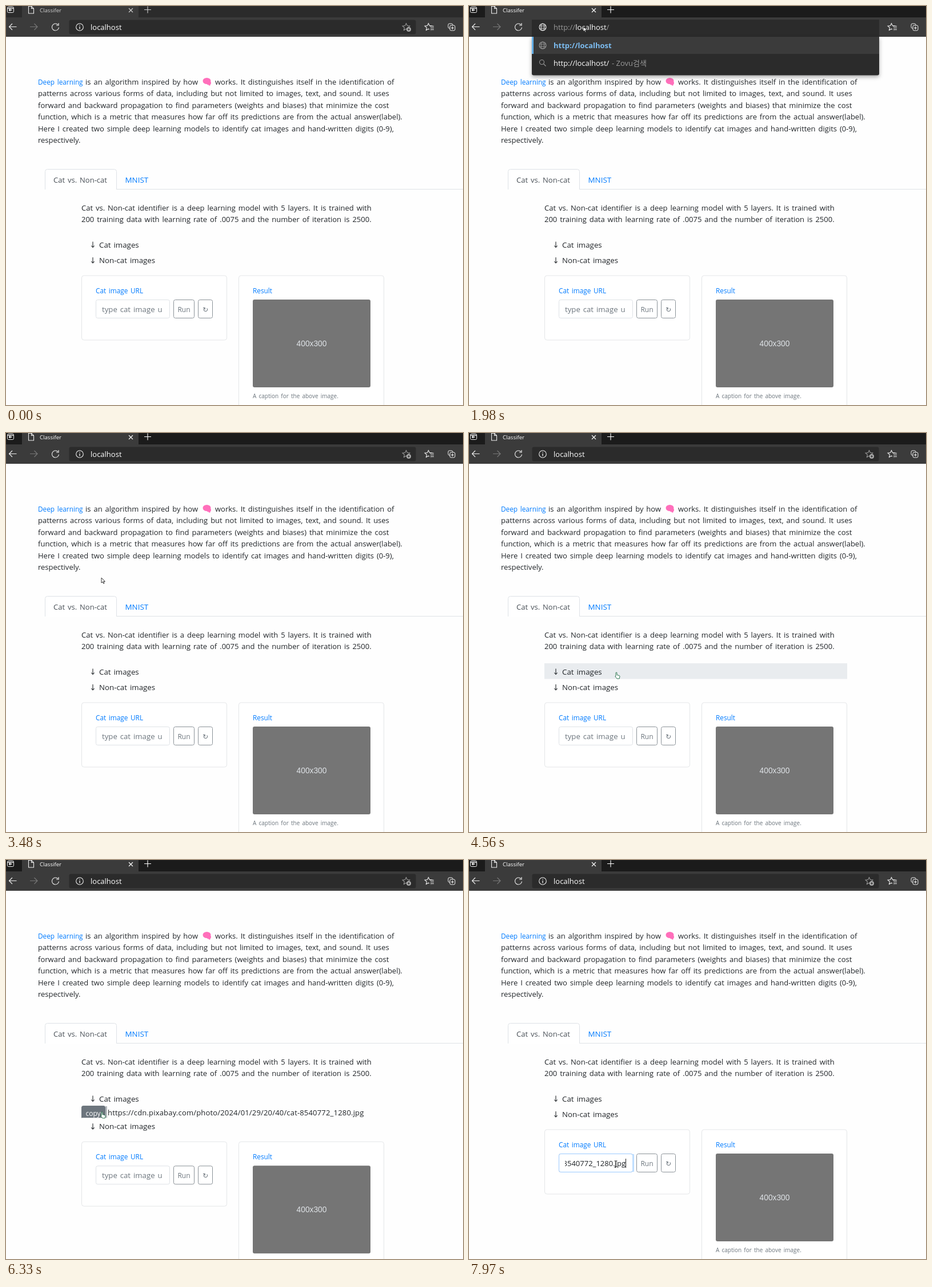
Write an HTML page with a canvas that moves like this. It is 800 by 700 pixels and loops after 8 s.

```html
<!DOCTYPE html>
<html lang="en">
<head>
<meta charset="utf-8">
<style>
html, body { margin: 0; width: 100%; height: 100%; overflow: hidden; background: #fefefe; }
canvas { display: block; }
</style>
</head>
<body>
<canvas id="stage" width="800" height="700"></canvas>
<script>
const g = document.getElementById('stage').getContext('2d');
const LOOP = 8000;
const INK = '#212529', BLUE = '#007bff', GRAY = '#6c757d', LINE = '#dee2e6', WHITE = '#fff';
const SANS = '"Open Sans", "Noto Sans CJK KR", sans-serif';
const ARIAL = '"Liberation Sans", sans-serif';

// Two page layouts: the styled one and the one flashed while reloading.
const STYLED = {
  gap: 1.55, bg: '#fefefe', radius: 4, link: 11.8, weight: 400, up: 0, gutter: 132,
  item: [163, 152, 13.3], intro: [139, 352, 366], tab: [68, 126], mnist: 208.5,
  lines: ['works. It distinguishes itself in the identification of',
    'patterns across various forms of data, including but not limited to images, text, and sound. It uses',
    'forward and backward propagation to find parameters (weights and biases) that minimize the cost',
    'function, which is a metric that measures how far off its predictions are from the actual answer(label).',
    'Here I created two simple deep learning models to identify cat images and hand-written digits (0-9),',
    'respectively.'],
  about: ['Cat vs. Non-cat identifier is a deep learning model with 5 layers. It is trained with',
    '200 training data with learning rate of .0075 and the number of iteration is 2500.'],
  cardW: 255, cardX: 407, input: [157, 129], run: [293, 37], redo: [336, 26],
  hint: [168, 106, 'type cat image url'], photo: [432, 206, 154], label: 13.8, caption: [688, 10]
};
const BARE = {
  gap: 0, bg: '#f9f9f9', radius: 0, link: 11.4, weight: 600, up: 20.5, gutter: 135,
  item: [165, 158, 13.1], intro: [138, 341, 354], tab: [68, 122], mnist: 204,
  lines: ['works. It distinguishes itself in the identification of patterns',
    'across various forms of data, including but not limited to images, text, and sound. It uses forward and',
    'backward propagation to find parameters (weights and biases) that minimize the cost function, which is a',
    'metric that measures how far off its predictions are from the actual answer(label). Here I created two simple',
    'deep learning models to identify cat images and hand-written digits (0-9), respectively.'],
  about: ['Cat vs. Non-cat identifier is a deep learning model with 5 layers. It is trained with 200',
    'training data with learning rate of .0075 and the number of iteration is 2500.'],
  cardW: 250, cardX: 410, input: [159, 70], run: [236, 64], redo: [306, 54],
  hint: [179, 40, 'type'], photo: [435, 200, 150], label: 13.3, caption: [684, 10.1]
};
const URLS = ['https://cdn.pixabay.com/photo/2024/01/29/20/40/cat-8540772_1280.jpg',
  'https://cdn.pixabay.com/photo/2024/02/17/00/18/cat-8578562_1280.jpg',
  'https://cdn.pixabay.com/photo/2023/06/01/06/22/british-shorthair-'];

// Pointer stops: time, x, y
const PATH = [[190, 739, 631], [600, 200, 36], [2980, 200, 36], [3770, 152, 349], [3820, 152, 350],
  [4100, 250, 418], [4300, 250, 418], [4560, 256, 420], [5110, 256, 421], [5580, 166, 442],
  [6500, 166, 442], [6850, 250, 532], [7040, 251, 532], [7430, 251, 532], [7570, 257, 533]];

const clamp = v => Math.max(0, Math.min(1, v));
const ramp = (t, start, len) => clamp((t - start) / len);
const easeOut = p => 1 - (1 - p) ** 2;
const smooth = p => p * p * (3 - 2 * p);

function rect(x, y, w, h, color) {
  g.fillStyle = color;
  g.fillRect(x, y, w, h);
}
function box(x, y, w, h, r, fill, stroke) {
  g.beginPath();
  g.roundRect(x + .5, y + .5, w - 1, h - 1, r);
  if (fill) { g.fillStyle = fill; g.fill(); }
  if (stroke) { g.strokeStyle = stroke; g.lineWidth = 1; g.stroke(); }
}
function text(s, x, y, color = INK, size = 13, weight = 400, family = SANS) {
  g.font = `${weight} ${size}px ${family}`;
  g.fillStyle = color;
  g.fillText(s, x, y);
}
function stroke(d, color = '#eee', width = 1.1) {
  g.strokeStyle = color;
  g.lineWidth = width;
  g.stroke(new Path2D(d));
}
function clipped(x, y, w, h, draw) {
  g.save();
  g.beginPath();
  g.rect(x, y, w, h);
  g.clip();
  draw();
  g.restore();
}
function ring(x, y, r, color = '#eee', a = 0, b = 7) {
  g.beginPath();
  g.arc(x, y, r, a, b);
  g.strokeStyle = color;
  g.lineWidth = 1.1;
  g.stroke();
}
function centered(draw) {
  g.textAlign = 'center';
  draw();
  g.textAlign = 'left';
}

function brain(x) {
  g.fillStyle = '#ff6fbb';
  g.beginPath();
  g.ellipse(x - .5, 131.5, 7, 5.6, 0, 0, 7);
  g.ellipse(x + 3, 135, 4, 3.4, 0, 0, 7);
  g.fill();
  rect(x + 3, 136, 2.5, 3.5, '#ff6fbb');
}

function links(height, t) {
  clipped(0, 431, 800, height, () => {
    const on = ramp(t, 5450, 130);
    for (let i = 0; i < 3; i++) {
      const y = 431 + i * 26, hot = i === 0 && on > 0;
      box(132, y, 42, 27, 3, WHITE, '#8b9298');
      if (hot) {
        g.globalAlpha = on;
        box(132, y, 42, 27, 3, GRAY, GRAY);
        g.globalAlpha = 1;
      }
      if (hot && t > 6050) rect(174, y + 1, 3, 26, '#b5babe');
      text('copy', 139.5, y + 18, on > .5 && hot ? WHITE : GRAY, 12);
      g.letterSpacing = '0.18px';
      text(URLS[i], 178, y + 17);
      g.letterSpacing = '0px';
    }
    text('8032816_1280.jpg', 132, 525.5);
  });
}

function field(L, t) {
  const [x, w] = L.input, focus = ramp(t, 7430, 150), pasted = t >= 7930;
  box(x, 515, w + 1, 33, 3, WHITE, LINE);
  if (focus) {
    g.globalAlpha = focus;
    box(x, 515, w + 1, 33, 3, null, '#9ccaff');
    rect(x + w, 516, 3, 31, '#bfdeff');
    g.globalAlpha = 1;
  }
  const [hx, hw, hint] = L.hint;
  clipped(hx, 516, hw, 31, () => {
    if (pasted) {
      g.textAlign = 'right';
      text('8540772_1280.jpg', 274, 537);
      g.textAlign = 'left';
    } else text(hint, hx, 537, GRAY, 13.2);
  });
  if (focus) rect(pasted ? 274 : 168, 524, 1, 16, '#222');
}

function page(L, t, open) {
  rect(0, 54, 800, 646, L.bg);
  g.wordSpacing = L.gap + 'px';
  const [introX, brainX, restX] = L.intro;
  text('Deep learning', 56, 137.5, BLUE, L.link, L.weight);
  text('is an algorithm inspired by how', introX, 137.5);
  brain(brainX);
  L.lines.forEach((s, i) => text(s, i ? 56 : restX, 137.5 + 20.5 * i));

  g.save();
  g.translate(0, -L.up);
  const [tabX, tabW] = L.tab;
  rect(tabX, 321, 732, 1, LINE);
  box(tabX, 286, tabW, 40, 4, WHITE, LINE);
  rect(tabX - 1, 322, tabW + 2, 5, L.bg);
  rect(tabX + 1, 321, tabW - 2, 1, WHITE);
  text('Cat vs. Non-cat', 83, 309.5, '#495057');
  text('MNIST', L.mnist, 309.5, BLUE, 13.4);
  L.about.forEach((s, i) => text(s, L.gutter, 358.5 + 20.5 * i));

  const hover = ramp(t, 4020, 80) * (1 - ramp(t, 6050, 100));
  if (hover) {
    g.globalAlpha = hover;
    rect(132, 404, 530, 27.5, '#e9ecef');
    g.globalAlpha = 1;
  }
  const [itemX, arrowX, itemSize] = L.item;
  const item = (s, y) => {
    stroke(`M${arrowX} ${y - 10}v10m-2.7 -3l2.7 3l2.7 -3`, INK);
    text(s, itemX, y, INK, itemSize);
  };
  item('Cat images', 423.5);
  if (open > 0) links(open, t);
  g.translate(0, open);
  item('Non-cat images', 451);

  box(L.gutter, 472.5, L.cardW, 114, L.radius, WHITE, '#e4e6e8');
  box(L.cardX, 472.5, L.cardW, 300, L.radius, WHITE, '#e4e6e8');
  text('Cat image URL', L.input[0], 504, BLUE, L.link, L.weight);
  field(L, t);
  for (const [b, s, family] of [[L.run, 'Run', SANS], [L.redo, '↻', '"DejaVu Sans", sans-serif']]) {
    box(b[0], 515, b[1], 33, 3, WHITE, '#8b9298');
    centered(() => text(s, b[0] + b[1] / 2, 536.5, GRAY, 12, 400, family));
  }
  const [px, pw, ph] = L.photo;
  text('Result', px, 504, BLUE, L.link, L.weight);
  g.beginPath();
  g.roundRect(px, 515, pw, ph, 3);
  g.fillStyle = '#757575';
  g.fill();
  centered(() => text('400x300', px + pw / 2, 515 + ph / 2 + 4.7, LINE, L.label, 400, ARIAL));
  const [capY, capSize] = L.caption;
  text('A caption for the above image.', px, capY, GRAY, capSize, L.weight);
  g.restore();
  g.wordSpacing = '0px';
}

function globe(y, color) {
  ring(129, y, 6, color);
  stroke(`M123.5 ${y - 2}h11M123.5 ${y + 2}h11`, color, .9);
  g.beginPath();
  g.ellipse(129, y, 2.8, 6, 0, 0, 7);
  g.stroke();
}

function dropdown(alpha) {
  g.save();
  g.globalAlpha = alpha;
  if (alpha === 1) { g.shadowColor = 'rgba(0,0,0,.35)'; g.shadowBlur = 7; g.shadowOffsetY = 3; }
  g.beginPath();
  g.roundRect(110, 54, 608, 67.5, [0, 0, 3, 3]);
  g.fillStyle = '#2b2b2b';
  g.fill();
  g.shadowColor = 'transparent';
  if (alpha === 1) rect(110, 54, 608, 30, '#3b3b3b');
  rect(110, 54, 3, 30, '#63ade5');
  globe(69, '#999');
  text('http://localhost', 148, 73.5, '#7cbcf0', 13, 700);
  ring(127.5, 98.5, 4, '#999');
  stroke('M130.5 101.5l4 4', '#999');
  text('http://localhost/', 148, 104.5, WHITE);
  text('- Zovu검색', 250, 104.5, '#999');
  g.restore();
}

function chrome(t) {
  const active = t >= 960, typing = active && t < 2380, loading = t >= 2380 && t < 2630;
  rect(0, 0, 800, 21, active ? '#1b1b1b' : '#2b2b2b');
  rect(0, 20, 800, 34, '#3b3b3b');
  rect(28, 0, 204, 21, '#3b3b3b');
  box(2, 1, 12, 11, 2, null, '#eee');
  stroke('M2 4h11M10.5 7h-5m2 -2l-2 2l2 2', '#eee', 1.5);

  if (loading) {
    g.fillStyle = '#4aa3f0';
    g.beginPath();
    g.arc(39, 9, 1.3, 0, 7);
    g.fill();
  } else stroke('M39.5 .5h5l4 4v8.5h-9zM44.5 .5v4h4');
  const title = active ? WHITE : '#d0d0d0';
  text('Classifer', 59, 10.5, title, 9.6);
  stroke('M215 4l7 7M222 4l-7 7', title);
  stroke('M242 6.5h12M248 .5v12', title);

  stroke('M18.5 36.5h-13m5.5 -5.5l-5.5 5.5l5.5 5.5', '#eee', 1.2);
  stroke('M42 36.5h13m-5.5 -5.5l5.5 5.5l-5.5 5.5', '#777', 1.2);
  if (loading) stroke('M81.5 32l9.5 9.5M91 32l-9.5 9.5', '#eee', 1.2);
  else {
    ring(86.5, 37, 6, '#eee', .1, 5.5);
    stroke('M92 30v4h-4', '#eee', 1.2);
  }

  const star = 'l1.9 4.1l4.5 .5l-3.4 3l1 4.4l-4 -2.3l-4 2.3l1 -4.4l-3.4 -3l4.5 -.5z';
  stroke('M739.5 30.5' + star);
  rect(741, 35, 9, 8, '#3b3b3b');
  stroke('M742 35.5h7M743 38.5h6M743 41.5h6');
  box(773.5, 30.5, 9, 9, 2, null, '#eee');
  box(776.5, 33.5, 10, 10, 2, '#3b3b3b', '#eee');
  stroke('M781.5 36v5M779 38.5h5');

  const hover = t > 560 && !active;
  box(110, 24, 608, 26, 3, hover ? '#303030' : '#2b2b2b', typing && t < 1480 ? '#63ade5' : null);
  if (typing) {
    if (t >= 1480) rect(110, 24, 608, 30, '#2b2b2b');
    globe(37, '#eee');
    if (t < 1480) {
      rect(148, 28, 98, 18, '#2a6fb5');
      text('http://localhost/', 148, 41.5, WHITE);
    } else {
      let x = 148;
      for (const [s, c] of [['http://', '#999'], ['localhost', WHITE], ['/', '#999']]) {
        text(s, x, 41.5, c);
        x += g.measureText(s).width;
      }
      if (t < 1980) rect(246, 27, 1, 18, WHITE);
    }
  } else {
    ring(129, 37, 6.3);
    stroke('M129 36v4.5M129 33.2v1.4', '#eee', 1.3);
    text('localhost', 148, 41.5, WHITE);
    stroke('M700.5 30.5' + star, '#999');
    g.beginPath();
    g.arc(705, 41, 4, 0, 7);
    g.fillStyle = '#aaa';
    g.fill();
    stroke('M703 41h4M705 39v4', '#2b2b2b');
  }
}

function pointer(t) {
  if (t < PATH[0][0]) return;
  const i = PATH.findLastIndex(k => k[0] <= t);
  const a = PATH[i], b = PATH[i + 1] || a;
  const p = smooth(b === a ? 0 : (t - a[0]) / (b[0] - a[0]));
  const x = a[1] + (b[1] - a[1]) * p, y = a[2] + (b[2] - a[2]) * p;
  g.save();
  g.translate(Math.round(x), Math.round(y));
  if (t > 6800) {
    stroke('M-2.5 -5h5M0 -5v10M-2.5 5h5', '#222', 1);
  } else {
    const hand = t > 4020 && t < 6560;
    const d = hand ? 'M1 .5q1 -1 2 0v4l4 1q1 .5 1 1.5l-.8 4h-4.2l-3.2 -4q.2 -1 1.2 -.3z'
      : 'M0 0v9l2.1 -2l1.5 3.2l1.5 -.7l-1.5 -3h2.8z';
    g.fillStyle = WHITE;
    g.fill(new Path2D(d));
    stroke(d, hand ? '#1d6b45' : '#222', .9);
  }
  g.restore();
}

function draw(t) {
  const open = 97 * (easeOut(ramp(t, 4640, 350)) - easeOut(ramp(t, 6145, 350)));
  page(t >= 2450 && t < 2530 ? BARE : STYLED, t, open);
  chrome(t);
  const shade = t < 1480 ? 0 : 1 - ramp(t, 2380, 82);
  if (shade) dropdown(shade);
  pointer(t);
}

const start = performance.now();
function frame() {
  draw((performance.now() - start) % LOOP);
  requestAnimationFrame(frame);
}
frame();
</script>
</body>
</html>
```
